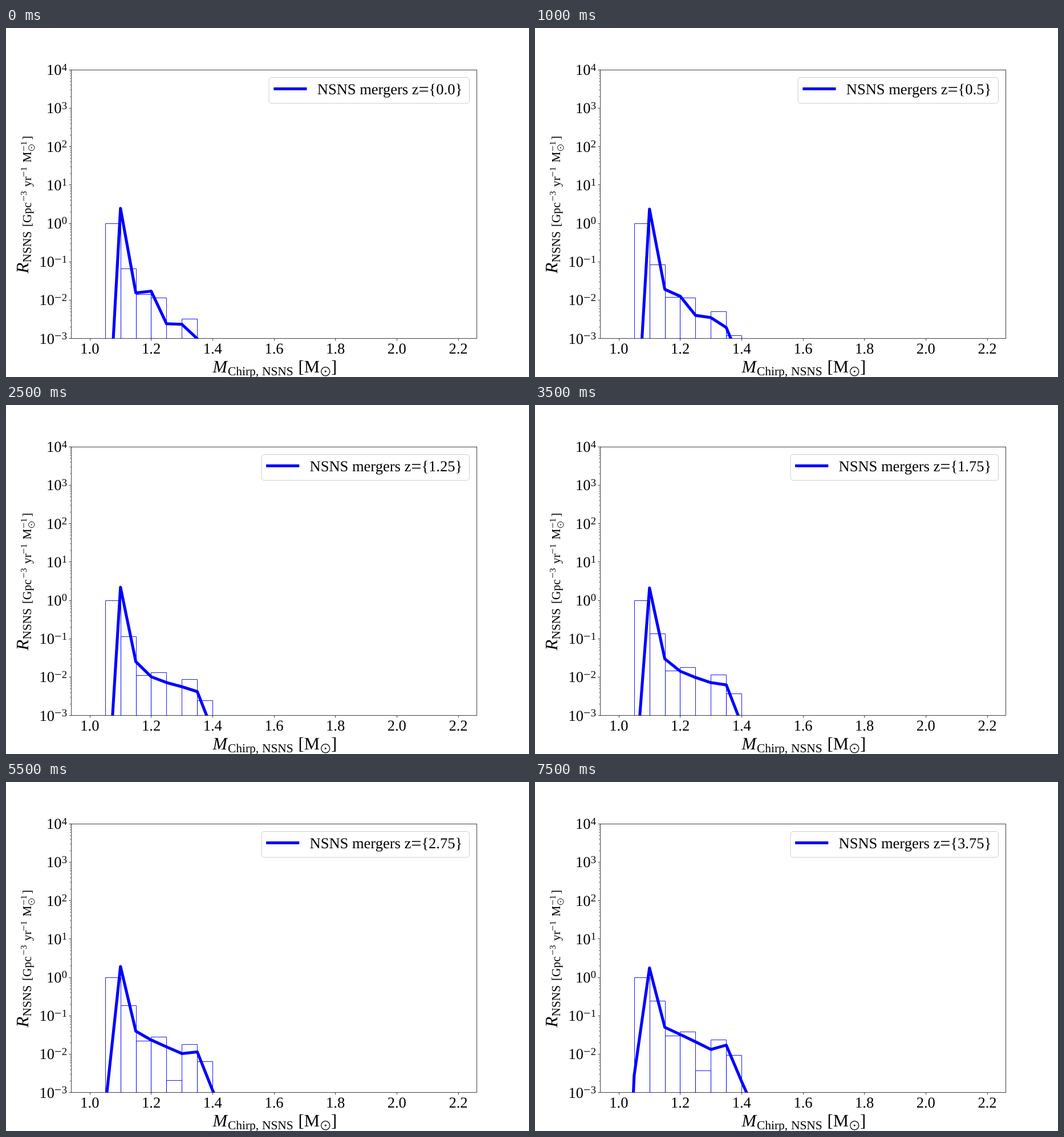
An HTML page that plays this animation: 917x611 px, repeating every 8 s.

```html
<!DOCTYPE html>
<html lang="en">
<head>
<meta charset="utf-8">
<title>Chirp mass rates by redshift</title>
<style>
  html, body { margin: 0; width: 100%; height: 100%; overflow: hidden; background: #fff; }
  svg { display: block; width: 917px; height: 611px; }
  text { font-family: "Liberation Serif", "Times New Roman", serif; font-size: 26.5px; text-rendering: geometricPrecision; white-space: pre; }
  .mid { text-anchor: middle; }
  .end { text-anchor: end; }
  .label text { font-size: 30.6px; }
  .label .sub { font-size: 21.4px; }
  .label .sup { font-size: 15px; }
  .label .supminus { font-size: 18px; }
  .exp { font-size: 18.6px; }
  .minus { font-size: 22px; }
  .eq { font-size: 32.2px; }
  .it { font-style: italic; }
  .axis { fill: none; stroke: #000; stroke-width: .75; }
  .minor { stroke-width: .55; }
  .bars { fill: none; stroke: #00f; stroke-width: .9; }
  .curve { fill: none; stroke: #00f; stroke-width: 5.1; stroke-linejoin: round; }
  .sun { fill: none; stroke: #000; }
</style>
</head>
<body>
<svg viewBox="0 0 917 611">
  <clipPath id="area"><rect x="114.6" y="73.3" width="710.7" height="470.5"/></clipPath>
  <g clip-path="url(#area)">
    <path id="bars" class="bars"/>
    <path id="curve" class="curve"/>
  </g>
  <path id="minor" class="axis minor"/>
  <path id="major" class="axis"/>
  <rect class="axis" x="114.5" y="73.5" width="711" height="470"/>
  <g id="ticks"></g>

  <rect id="box" y="86.5" height="45.5" rx="5" fill="#fff" stroke="#ccc"/>
  <path id="key" class="curve"/>
  <text id="legend" y="116.4">NSNS mergers z<tspan class="eq" dy="1.5">=</tspan><tspan id="z" dy="-1.5"></tspan></text>

  <g class="label">
    <text class="it" x="362.5" y="603.2">M</text>
    <text class="sub" x="389" y="608.4">Chirp,</text>
    <text class="sub" x="449" y="608.4">NSNS</text>
    <text x="512.5" y="603.2">[M</text>
    <circle class="sun" cx="560.2" cy="601.3" r="7.6" stroke-width="1.3"/>
    <circle cx="560.2" cy="601.3" r="1.5"/>
    <text x="570" y="603.2">]</text>
  </g>

  <g class="label" transform="translate(0 430) rotate(-90)">
    <text class="it" x="0.5" y="39">R</text>
    <text class="sub" x="19.5" y="44">NSNS</text>
    <text class="sub" x="82" y="44">[Gpc</text>
    <text class="supminus" x="126.5" y="36.7">−</text><text class="sup" x="137" y="36">3</text>
    <text class="sub" x="152" y="44">yr</text>
    <text class="supminus" x="169" y="36.7">−</text><text class="sup" x="179.5" y="36">1</text>
    <text class="sub" x="194.5" y="44">M</text>
    <text class="supminus" x="214" y="36.7">−</text><text class="sup" x="224.5" y="36">1</text>
    <circle class="sun" cx="220.5" cy="44.8" r="5.2"/>
    <circle cx="220.5" cy="44.8" r="1.1"/>
    <text class="sub" x="234" y="44">]</text>
  </g>
</svg>
<script>
const $ = id => document.getElementById(id);
const BOTTOM = 543.8, DECADE = 470.5 / 7, BIN = 0.05;
const STEP = 500, COUNT = 16;
const px = mass => 114.6 + (mass - 0.94) * 538.4;
const py = power => BOTTOM - (power + 3) * DECADE;
const crisp = v => Math.floor(v + 0.35) + 0.5;

// Axis ticks and their labels
let major = '', minor = '', labels = '';
for (let i = 0; i < 7; i++) {
  const mass = 1 + i * 0.2, x = px(mass);
  major += `M${crisp(x)} 544v3.5`;
  labels += `<text class="mid" x="${x}" y="570">${mass.toFixed(1)}</text>`;
}
for (let p = -3; p <= 4; p++) {
  const y = py(p), neg = p < 0;
  major += `M114 ${Math.floor(y) + 0.5}h-3.5`;
  labels += `<text class="end" x="${neg ? 85 : 97.5}" y="${y + 8.8}">10</text>` +
    (neg ? `<text class="minus" x="85" y="${y + 2.3}">−</text>` : '') +
    `<text class="exp" x="97.7" y="${y + 1.3}">${Math.abs(p)}</text>`;
  if (p < 4) for (let k = 2; k < 10; k++) minor += `M114 ${py(p + Math.log10(k)).toFixed(2)}h-2`;
}
$('major').setAttribute('d', major);
$('minor').setAttribute('d', minor);
$('ticks').innerHTML = labels;

// Heights above the lower axis: each rate saturates as redshift grows,
// and some bins start with a surplus that is gone after four steps
function heights(step) {
  const rise = (from, gain, pace = 10) => from + gain * (1 - Math.exp(-step / pace));
  const surplus = size => size * Math.max(0, 1 - step / 4);
  return {
    // One vertex per bin edge, from mass 1.0
    curve: [
      -600,
      rise(-537, 642, 7) + surplus(280),
      228 - 0.65 * step,
      rise(80, 65, 20),
      rise(33.4, 88) + surplus(49.6),
      rise(26, 81),
      rise(25, 65),
      rise(0, 107),
      rise(-60, 151, 20),
      rise(-110, 130, 20)
    ],
    // One bar per bin, from mass 1.05
    bars: [
      3 * DECADE,
      rise(122, 72, 20),
      rise(40.3, 75.5) + surplus(36.7),
      rise(43.3, 80.7) + surplus(27.7),
      rise(-80, 152),
      rise(34, 75),
      rise(-13.5, 102)
    ]
  };
}

function draw(step) {
  const { curve, bars } = heights(step);
  $('bars').setAttribute('d', bars.map((h, i) => {
    const left = 1.05 + i * BIN;
    return `M${crisp(px(left))} 560V${Math.floor(BOTTOM - h) + 0.5}H${crisp(px(left + BIN))}V560`;
  }).join(''));
  $('curve').setAttribute('d', 'M' + curve.map((h, i) =>
    `${px(1 + i * BIN).toFixed(2)} ${(BOTTOM - h).toFixed(2)}`).join('L'));

  const wide = step % 2, shift = wide ? -13.2 : 0;
  const left = wide ? 448 : 461;
  $('z').textContent = `{${(step / 4).toFixed(wide ? 2 : 1)}}`;
  $('legend').setAttribute('x', 545.8 + shift);
  $('key').setAttribute('d', `M${469.3 + shift} 106.5h58.2`);
  $('box').setAttribute('x', left);
  $('box').setAttribute('width', 812.5 - left);
}

let shown = -1;
function frame() {
  const step = Math.floor(performance.now() / STEP) % COUNT;
  if (step !== shown) draw(shown = step);
  requestAnimationFrame(frame);
}
frame();
</script>
</body>
</html>
```
